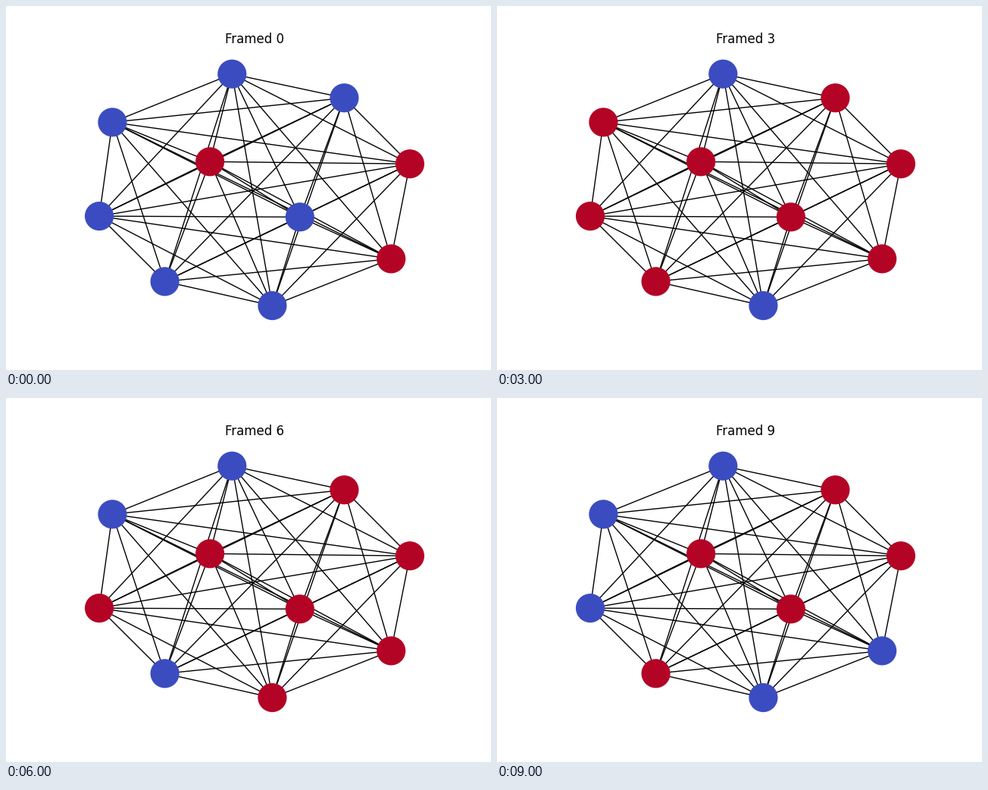
A matplotlib script for the animation above (10 s loop, 640 px wide and 480 px high).

```python
from itertools import combinations

import matplotlib.pyplot as plt
from matplotlib.animation import FuncAnimation
from matplotlib.collections import LineCollection

BLUE, RED = plt.cm.coolwarm(0.0), plt.cm.coolwarm(1.0)

# Node centres in stage pixels, y pointing down.
NODES = {
    "A": (298.3, 89.67),
    "B": (446.4, 121.2),
    "C": (140.4, 153.3),
    "D": (269.1, 205.3),
    "E": (532.96, 208.2),
    "F": (123.04, 277.1),
    "G": (387.8, 278.3),
    "H": (508.2, 333.4),
    "I": (209.6, 363.3),
    "J": (351.4, 395.13),
}

# Nodes that are red at each step.
ACTIVE = ["DEH", "DEFGJ", "BCEG", "BCDEFGHI", "CEFGHIJ",
          "ADEF", "BDEFGHJ", "CDEFJ", "BDEG", "BDEGI"]

plt.rcParams["font.family"] = "DejaVu Sans"
fig = plt.figure(figsize=(6.4, 4.8), dpi=100, facecolor="white")
ax = fig.add_axes([0.125, 0.11, 0.775, 0.77])
ax.set_xlim(80, 576)
ax.set_ylim(427.2, 57.6)
ax.axis("off")

points = list(NODES.values())
ax.add_collection(LineCollection(list(combinations(points, 2)),
                                 colors="black", linewidths=1.0, zorder=1))
dots = ax.scatter(*zip(*points), s=700, c=[BLUE] * len(points),
                  linewidths=1.0, zorder=2)
title = ax.set_title("", fontsize=12)


def update(step):
    colors = [RED if name in ACTIVE[step] else BLUE for name in NODES]
    dots.set_facecolor(colors)
    dots.set_edgecolor(colors)
    title.set_text(f"Framed {step}")
    return dots, title


anim = FuncAnimation(fig, update, frames=len(ACTIVE), interval=1000,
                     repeat=True, repeat_delay=0, blit=False)
plt.show()
```
